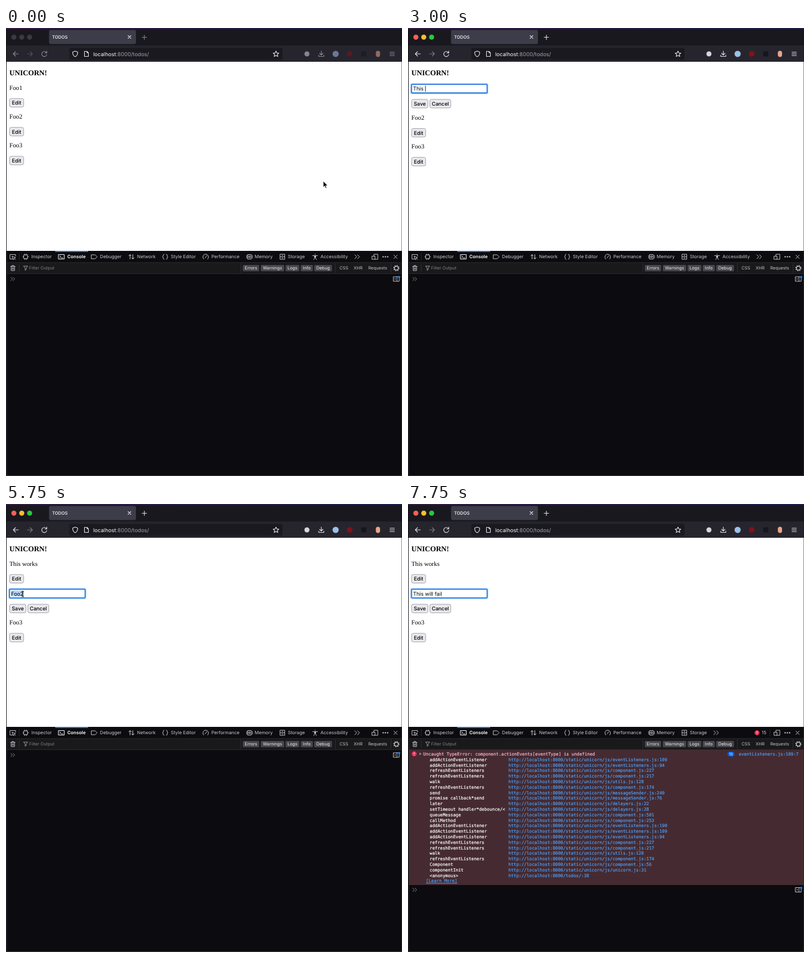
An HTML page that plays this animation: 704x796 px, repeating every 8000 ms.

```html
<!DOCTYPE html>
<html lang="en">
<head>
<meta charset="utf-8">
<title>TODOS</title>
<style>
  html, body { margin: 0; width: 100%; height: 100%; overflow: hidden; background: #131218; }
  svg { display: block; }
  text { white-space: pre; text-rendering: geometricPrecision; font-family: Inter, sans-serif; }
  .serif { font: 11.2px "Liberation Serif", serif; }
  .head { font: bold 13.1px "Liberation Serif", serif; }
  .field { font: 9.33px Inter, sans-serif; }
  .btn { font-size: 9.2px; font-weight: 500; }
  .tab { font-size: 8.2px; fill: #c9c9cf; }
  .tool { font-size: 7.7px; fill: #c4c4ca; }
  .mono { font-family: "DejaVu Sans Mono", monospace; font-size: 7.7px; stroke-width: .2; }
  .name { fill: #fff; stroke: #fff; }
  .link { fill: #4f9df5; stroke: #4f9df5; }
  .fail { fill: #ffb3d2; stroke: #ffb3d2; }
  .u { text-decoration: underline; }
  .ico { fill: none; stroke: #e6e6ec; stroke-width: 1.1; stroke-linecap: round; stroke-linejoin: round; }
  .dev .ico { stroke: #c4c4ca; stroke-width: 1; }
  .idle .dim { opacity: .55; }
  .idle .light { fill: #3b3a42; }
</style>
</head>
<body>
<svg id="stage" width="704" height="796" viewBox="0 0 704 796">
  <defs>
    <linearGradient id="edge">
      <stop offset="0" stop-color="#3a1d4a"/><stop offset="1" stop-color="#1b2450"/>
    </linearGradient>
  </defs>
  <g id="chrome"></g>
  <g id="page"></g>
  <g id="console" class="dev"></g>
  <g id="mouse"></g>
</svg>
<script>
const $ = id => document.getElementById(id);
const esc = s => String(s).replace(/</g, '&lt;');
const rect = (x, y, w, h, fill, more = '') =>
  `<rect x="${x}" y="${y}" width="${w}" height="${h}" fill="${fill}" ${more}/>`;
const dot = (x, y, r, fill, more = '') => `<circle cx="${x}" cy="${y}" r="${r}" fill="${fill}" ${more}/>`;
const text = (x, y, s, cls, more = '') => `<text x="${x}" y="${y}" class="${cls}" ${more}>${esc(s)}</text>`;
const icon = (x, y, d, more = '') => `<path class="ico" transform="translate(${x} ${y})" d="${d}" ${more}/>`;

const CROSS = 'M-3-3L3 3M3-3L-3 3';
const CHEVRONS = 'M-4-3L-1 0L-4 3M0-3L3 0L0 3';
const LINE = '#38383d';

function drawChrome() {
  const lights = ['#ff5f57', '#febc2e', '#28c840']
    .map((c, i) => dot(14 + 14 * i, 16.2, 4.5, c, 'class="light"')).join('');
  $('chrome').innerHTML =
    rect(0, 0, 704, 2, 'url(#edge)') +
    rect(1, 1.5, 702.5, 30, '#19181f', 'rx="4"') + rect(1, 31, 702.5, 29, '#26252e') +
    rect(76.5, 3.5, 154.5, 25, '#3d3c49', 'rx="3"') +
    text(82, 19.2, 'TODOS', '', 'font-size="7.8" font-weight="500" fill="#fbfbfe"') +
    icon(219.5, 16, 'M-2.5-2.5L2.5 2.5M2.5-2.5L-2.5 2.5') + lights +
    rect(112.5, 35.5, 379, 21, '#1a1920', 'rx="3"') +
    icon(123, 46, 'M0-5L4.5-3.3C4.5 1 3.5 3.5 0 5C-3.5 3.5-4.5 1-4.5-3.3Z') +
    icon(143, 46, 'M-3.5-4.5H1L3.5-2V4.5H-3.5ZM1-4.5V-2H3.5') +
    `<text x="155" y="49.6" font-size="9.5" fill="#a3a2ac"><tspan fill="#fbfbfe">localhost</tspan>:8000/todos/</text>` +
    icon(480, 46, 'M0-5L1.5-1.7L5-1.4L2.4 1L3.2 4.6L0 2.7L-3.2 4.6L-2.4 1L-5-1.4L-1.5-1.7Z') +
    '<g class="dim">' +
    icon(246, 16.5, 'M-4 0H4M0-4V4') +
    icon(17.5, 46, 'M4.5 0H-4.5M-.5-4L-4.5 0L-.5 4') +
    icon(42.5, 46, 'M-4.5 0H4.5M.5-4L4.5 0L.5 4', 'opacity=".45"') +
    icon(68, 46, 'M4-2A4.5 4.5 0 1 0 4.5 1M4.5-5V-1.8H1.3') +
    dot(535, 46, 4.5, '#d6d6dd') +
    icon(560.5, 46, 'M0-5V2M-3-1L0 2L3-1M-4.5 2V4.5H4.5V2') +
    dot(586, 46, 5.5, '#9dbfe8') + dot(611, 46, 5, '#85101a') +
    rect(631.5, 41.5, 9, 9, '#17161c', 'rx="1"') + rect(657.5, 40.5, 7.5, 11, '#e9a58a', 'rx="3.7"') +
    icon(686.5, 46, 'M-4-3H4M-4 0H4M-4 3H4') + '</g>';
}

const TABS = [
  [35, 45, 'Inspector', 'M-3.3-3.3H3.3V3.3H-3.3ZM-1.5-5V-3.3M1.5-5V-3.3M-1.5 3.3V5M1.5 3.3V5M-5 0H-3.3M3.3 0H5'],
  [98.5, 109, 'Console', 'M-5-4H5V4H-5ZM-3-1.7L-1 0L-3 1.7M0 2H2.5'],
  [157, 167, 'Debugger', 'M-5-3.5H1.5L5 0L1.5 3.5H-5Z'],
  [223, 233, 'Network', 'M-2.5 4V-4M-5-1.5L-2.5-4L0-1.5M2.5-4V4M0 1.5L2.5 4L5 1.5'],
  [283, 293, 'Style Editor', 'M-2-4.5Q-3.5-4.5-3.5-2.5Q-3.5 0-5 0Q-3.5 0-3.5 2.5Q-3.5 4.5-2 4.5M2-4.5Q3.5-4.5 3.5-2.5Q3.5 0 5 0Q3.5 0 3.5 2.5Q3.5 4.5 2 4.5'],
  [355, 365, 'Performance', 'M-3.5 4A5 5 0 1 1 3.5 4M-1 2L2-2'],
  [433, 442, 'Memory', 'M-3-4H3V4H-3ZM-1-1.5H1V1.5H-1ZM-5-2.5V2.5M5-2.5V2.5'],
  [491.5, 501, 'Storage', 'M-4-4.5H4V4.5H-4ZM-4 0H4M-1-2.3H1M-1 2.3H1'],
  [549.5, 559, 'Accessibility', 'M-4.5-2H4.5M0-4.8V-4M0-2V1L-2.5 5M0 1L2.5 5M-1-2V1M1-2V1'],
];
const FILTERS = [[421, 29, 'Errors'], [453, 41.5, 'Warnings'], [497, 24.5, 'Logs'], [524, 21.5, 'Info'], [548, 31.5, 'Debug']];

const ADD = 'addActionEventListener', REFRESH = 'refreshEventListeners';
const binding = [[ADD, 'eventListeners.js:109'], [ADD, 'eventListeners.js:94'],
  [REFRESH, 'component.js:227'], [REFRESH, 'component.js:217'],
  ['walk', 'utils.js:128'], [REFRESH, 'component.js:174']];
const TRACE = [...binding,
  ['send', 'messageSender.js:240'], ['promise callback*send', 'messageSender.js:76'],
  ['later', 'delayers.js:22'], ['setTimeout handler*debounce/<', 'delayers.js:28'],
  ['queueMessage', 'component.js:501'], ['callMethod', 'component.js:253'],
  [ADD, 'eventListeners.js:190'], ...binding,
  ['Component', 'component.js:56'], ['componentInit', 'unicorn.js:31'], ['<anonymous>', '']];

const alertMark = (x, y) => dot(x, y, 4.4, '#f0325c') +
  `<path d="M${x} ${y - 2.5}v2.8M${x} ${y + 1.8}v.6" stroke="#fff" stroke-width="1.1"/>`;

function errorRow(s) {
  let out = rect(1.5, 436.5, 702, s.open ? 240.5 : 15, '#452b31') +
    alertMark(11, 444) + '<path d="M20.5 441.5L24 444L20.5 446.5Z" fill="#a58b92"/>' +
    text(27, 446.9, 'Uncaught TypeError: component.actionEvents[eventType] is undefined', 'mono fail') +
    rect(568, 440, 12.5, 8.5, '#0060df', 'rx="4.2"') +
    text(574.2, 447, s.hits, '', 'font-size="7" fill="#fff" text-anchor="middle"') +
    text(588, 446.9, 'eventListeners.js:109:7', 'mono link') +
    (s.open ? text(32, 672.4, '[Learn More]', 'mono link u') : text(338, 446.9, '[Learn More]', 'mono link u'));
  if (s.open) TRACE.forEach(([fn, file], i) => {
    const y = 456.8 + 9.8 * i;
    out += text(38.5, y, fn, 'mono name') +
      text(178.5, y, 'http://localhost:8000/' + (file ? 'static/unicorn/js/' + file : 'todos/:38'), 'mono link');
  });
  return out;
}

function drawConsole(s) {
  const y = !s.hits ? 446 : s.open ? 685.5 : 460.5;
  const tabs = s.hits ? TABS.slice(0, -1) : TABS;
  $('console').innerHTML =
    rect(1, 396, 702.5, 399.5, '#0c0b0f') + rect(1.5, 417, 702, 19, '#19191c') +
    rect(1, 416.5, 702.5, .7, LINE) + rect(1, 436, 702.5, .7, LINE) +
    rect(87.5, 396, 58.5, 2, '#2f6fe0') +
    icon(12, 406.5, 'M0 4H-5V-4H5V-1M-1-1L5 1.5L2.5 2.5L1.5 5ZM3 3L5 5') + rect(23, 400, .7, 13, LINE) +
    tabs.map(([ix, tx, label, d]) => {
      const on = label === 'Console' ? 'style="fill:#fff;font-weight:600"' : '';
      return icon(ix, 406.5, d, on && 'style="stroke:#fff"') + text(tx, 409.4, label, 'tab', on);
    }).join('') +
    icon(s.hits ? 547.5 : 624, 406.5, 'M-4-3.5L-.5 0L-4 3.5M1-3.5L4.5 0L1 3.5') +
    (s.hits ? alertMark(s.badge > 9 ? 620.5 : 625.5, 406.5) +
      text(637, 409.4, s.badge, 'tab', 'text-anchor="end"') + rect(643, 400, .7, 13, LINE) : '') +
    icon(656, 406.5, 'M-2-1V-4.5H5V4.5H0M-5-1H0V4.5H-5Z') +
    [670.5, 674.5, 678.5].map(x => dot(x, 406.5, 1.2, '#c4c4ca')).join('') + icon(692.5, 406.5, CROSS) +
    icon(12.2, 426.5, 'M-4-3H4M-1.5-3V-4.5H1.5V-3M-3-3V4.5H3V-3M-1-1V2.5M1-1V2.5') + rect(23, 420, .7, 13, LINE) +
    icon(35, 426.5, 'M-3.5-3.5H3.5L1 0V2.5L-1 4V0Z', 'opacity=".75"') +
    text(41, 429.4, 'Filter Output', 'tool', 'style="fill:#808087"') +
    FILTERS.map(([x, w, label]) => rect(x, 421, w, 11.3, '#46464c', 'rx="1.5"') +
      text(x + w / 2, 429.4, label, 'tool', 'text-anchor="middle" style="fill:#ececf0"')).join('') +
    text(593, 429.4, 'CSS', 'tool') + text(618, 429.4, 'XHR', 'tool') + text(644, 429.4, 'Requests', 'tool') +
    [417, 585, 684].map(x => rect(x, 418, .7, 17, LINE)).join('') +
    dot(694, 426.7, 3.4, 'none', 'stroke="#c4c4ca" stroke-width="1.3"') +
    dot(694, 426.7, 4.7, 'none', 'stroke="#c4c4ca" stroke-width="1.6" stroke-dasharray="1.7 1.99"') +
    (s.hits ? errorRow(s) : '') +
    icon(12.5, y, CHEVRONS, 'style="stroke:#8a8a91"') +
    icon(694, y, 'M-5-4H5V4H-5ZM1-4V4M-3-1.5L-1.5 0L-3 1.5') + dot(699, y - 3.5, 2, '#0a84ff') +
    rect(1, 396, .7, 399.5, '#34343a') + rect(702.8, 396, .7, 399.5, '#34343a') + rect(1, 795, 702.5, 1, '#3c3b42');
}

const ruler = document.createElement('canvas').getContext('2d');
ruler.font = '9.33px Inter, sans-serif';
const widthOf = str => ruler.measureText(str).width;

const button = (x, y, w, label, hot) =>
  rect(x, y - 7.7, w, 15.2, hot ? '#c1c1c8' : '#e9e9ed', `rx="2.8" stroke="${hot ? '#62626d' : '#8f8f9d'}" stroke-width=".8"`) +
  text(x + w / 2, y + 3.3, label, 'btn', 'text-anchor="middle"');

function field(y, s) {
  let out = s.focus
    ? rect(5, y - 9, 137, 18, 'none', 'rx="2.5" stroke="#a9d2f8" stroke-width="1.6"') +
      rect(6.4, y - 7.6, 134.2, 15.2, '#fff', 'rx="1.2" stroke="#0a66e0" stroke-width="1.6"')
    : rect(6.4, y - 7.3, 134.2, 14.6, '#fff', 'rx="1" stroke="#85858f" stroke-width=".9"');
  if (s.select) out += rect(9, y - 5.5, widthOf(s.value), 11, '#b4d5fe');
  out += text(9, y + 3.4, s.value, 'field');
  if (s.caret) out += rect(9.2 + widthOf(s.value), y - 5.3, .9, 10.6, '#000');
  return out;
}

function drawPage(s) {
  let y = 106, out = rect(1, 60, 702.5, 336, '#fff') + text(6, 84, 'UNICORN!', 'head');
  [s.first, 'Foo2', 'Foo3'].forEach((label, i) => {
    if (s.edit === i) {
      out += field(y + 1.8, s) + button(6.4, y + 28.5, 29, 'Save', s.hot === i) + button(38.8, y + 28.5, 37.2, 'Cancel');
      y += 53.2;
    } else {
      out += text(6, y + 3.8, label, 'serif') + button(6.4, y + 27, 25, 'Edit', s.hot === i);
      y += 51.3;
    }
  });
  $('page').innerHTML = out;
}

function drawMouse(s) {
  const d = s.beam ? 'M-2-5Q0-5 0-3.5Q0-5 2-5M0-3.5V3.5M-2 5Q0 5 0 3.5Q0 5 2 5' : 'M0 0V11L2.6 8.7L4.3 12.6L6.2 11.8L4.5 8H8Z';
  const paint = s.beam ? 'fill="none" stroke="#000"' : 'fill="#000" stroke="#fff" stroke-width=".9"';
  $('mouse').innerHTML = s.hide ? '' : `<path transform="translate(${s.x} ${s.y})" d="${d}" ${paint}/>`;
}

// Each cue changes part of the state at a multiple of STEP.
const STEP = 250, STEPS = 32;
const type = (value, more) => ({ value, select: 0, caret: 1, hide: 1, ...more });
const errors = (hits, badge = hits) => ({ hits, badge });
const CUES = {
  0: { x: 564, y: 272, first: 'Foo1', edit: -1, hot: -1 },
  1: { x: 470, y: 247 },
  2: { x: 160, y: 164 },
  3: { x: 22, y: 127, active: 1 },
  4: { hot: 0 },
  5: { edit: 0, value: 'Foo1' },
  7: { x: 30, y: 108, beam: 1, hot: -1 },
  8: { focus: 1, select: 1 },
  9: type('T'),
  10: type('Th'),
  11: type('This'),
  12: type('This '),
  13: type('This wo'),
  14: type('This work'),
  15: type('This works'),
  16: { x: 24, y: 131, beam: 0, hide: 0, hot: 0 },
  17: { focus: 0, caret: 0 },
  18: { first: 'This works', edit: -1, hot: -1, x: 27, y: 158 },
  19: { x: 30, y: 184, hot: 1 },
  20: { edit: 1, value: 'Foo2' },
  21: { x: 30, y: 160, beam: 1, hot: -1 },
  22: { focus: 1, select: 1 },
  24: type('T', errors(1)),
  25: type('Th', errors(2)),
  26: type('Thi', { open: 1, ...errors(3, 2) }),
  27: type('This ', errors(5)),
  28: type('This wi', errors(8)),
  29: type('This will', errors(10)),
  30: type('This will fai', errors(14)),
  31: type('This will fail', { caret: 0, ...errors(15) }),
};
const states = [];
for (let i = 0; i < STEPS; i++) states.push({ ...states[i - 1], ...CUES[i] });

let shown = -1;
function tick() {
  const step = Math.floor(performance.now() / STEP) % STEPS;
  if (step !== shown) {
    const s = states[shown = step];
    $('stage').classList.toggle('idle', !s.active);
    drawPage(s);
    drawConsole(s);
    drawMouse(s);
  }
  requestAnimationFrame(tick);
}
drawChrome();
tick();
</script>
</body>
</html>
```
